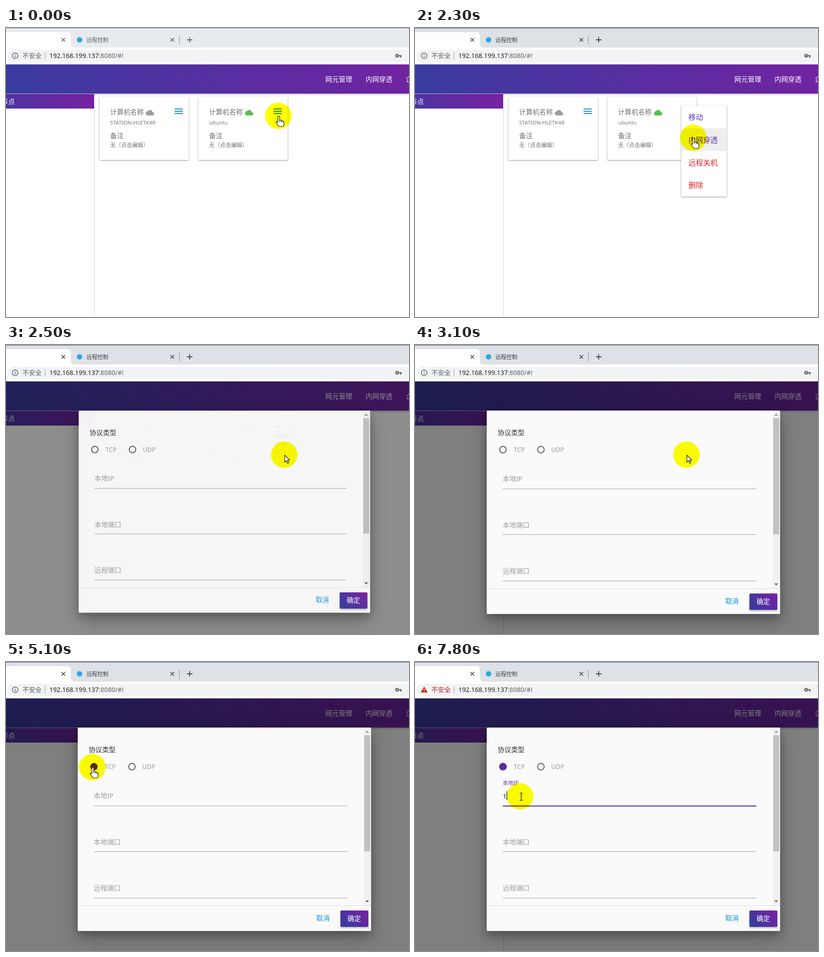
An HTML page for the animation above (8 s loop, 882x635 px).

```html
<!DOCTYPE html>
<html lang="zh-CN">
<head>
<meta charset="utf-8">
<title>远程控制</title>
<style>
html, body { margin: 0; width: 100%; height: 100%; overflow: hidden; background: #fff; }
svg { display: block; width: 100vw; height: 100vh; }
text { font: 14.7px "Noto Sans", "Noto Sans CJK SC", "Noto Sans CJK", sans-serif; white-space: pre; }
.small { font-size: 11.6px; }
.tab { font-size: 12px; }
.url { font-size: 14.1px; }
.item { font-size: 16px; }
.line { fill: none; stroke-width: 1; }
.card { filter: drop-shadow(0 1px 1.5px rgba(0,0,0,.45)); }
#sheet { filter: drop-shadow(0 8px 9px rgba(0,0,0,.22)) drop-shadow(0 14px 20px rgba(0,0,0,.25)); }
#halo { mix-blend-mode: multiply; }
</style>
</head>
<body>
<svg viewBox="0 0 882 635">
  <defs>
    <linearGradient id="brand"><stop stop-color="#303f9f"/><stop offset="1" stop-color="#7b1fa2"/></linearGradient>
    <linearGradient id="navFill" href="#brand" gradientUnits="userSpaceOnUse" x1="154" y1="408" x2="746" y2="-184"/>
    <linearGradient id="sideFill" href="#brand" gradientUnits="userSpaceOnUse" x1="-42" y1="245" x2="125" y2="77"/>
    <linearGradient id="buttonFill" href="#brand" gradientUnits="userSpaceOnUse" x1="738" y1="588" x2="787" y2="540"/>
    <path id="cloud" transform="translate(306 177) scale(.76)" d="M19.35 10.04C18.67 6.59 15.64 4 12 4 9.11 4 6.6 5.64 5.35 8.04 2.34 8.36 0 10.91 0 14c0 3.31 2.69 6 6 6h13c2.76 0 5-2.24 5-5 0-2.64-2.05-4.78-4.65-4.96z"/>
    <path id="cross" d="M-4-4 4 4M4-4-4 4" stroke-width="1.6"/>
    <g id="card">
      <rect class="card" x="204.5" y="151" width="195.5" height="139" rx="2" fill="#fff"/>
      <g fill="#707070">
        <text x="228" y="190">计算机名称</text>
        <text x="228" y="242">备注</text>
        <text x="228" y="262" style="font-size:12px">无（点击编辑）</text>
      </g>
      <path d="M369 178h18M369 183h18M369 188h18" stroke="#0c8bd9" stroke-width="2"/>
    </g>
  </defs>

  <rect width="882" height="635" fill="#fff"/>

  <!-- page -->
  <path d="M193.5 177V635" stroke="#d8d8d8"/>
  <rect y="80" width="882" height="64" fill="url(#navFill)" style="filter:drop-shadow(0 1px 2px rgba(0,0,0,.4))"/>
  <g fill="#fff">
    <text x="699" y="118">网元管理</text>
    <text x="787" y="118">内网穿透</text>
    <text x="875" y="118">企业管理</text>
  </g>
  <rect y="145" width="193" height="32" fill="url(#sideFill)"/>
  <path d="M0 144.5H193" stroke="#c4c0cc"/>
  <text x="-10" y="166.500" fill="#fff">节点</text>
  <circle cx="183" cy="167" r="5" class="line" stroke="#fff" stroke-dasharray="1 3" opacity=".25"/>
  <use href="#card"/>
  <use href="#card" x="216.5"/>
  <use href="#cloud" fill="#9e9e9e"/>
  <use href="#cloud" x="217" fill="#5cbf50"/>
  <g fill="#757575">
    <text class="small" x="228" y="212">STATION-HLETK4R</text>
    <text class="small" x="445" y="212">ubuntu</text>
  </g>
  <rect id="shade" y="80" width="882" height="555"/>

  <!-- browser frame -->
  <rect id="strip" width="882" height="43"/>
  <rect id="edge" width="882" height="1"/>
  <path d="M0 9h134q8 0 8 8v18q0 8 8 8H0z" fill="#fff"/>
  <rect y="43" width="882" height="37" fill="#fff"/>
  <rect x="3" y="48" width="920" height="27" rx="13.5" fill="#f1f3f4"/>
  <g id="tabInk" stroke="currentColor" fill="none">
    <use href="#cross" x="125.500" y="26"/>
    <use href="#cross" x="364" y="26"/>
    <path d="M402 20v12M396 26h12" stroke-width="1.8"/>
    <text class="tab" x="176" y="31" fill="currentColor" stroke="none">远程控制</text>
  </g>
  <path d="M379.500 16v21" stroke="#8b8f95"/>
  <circle cx="161" cy="26" r="6" fill="#2ea8e0"/>
  <g id="info" fill="none" stroke="#5f6368" stroke-width="1.5">
    <circle cx="20" cy="61" r="6.300"/><path d="M20 60v4.500M20 57v1.600"/>
  </g>
  <g id="warning">
    <path d="M20 54l7.500 13h-15z" fill="#c5221f"/><path d="M20 59v4M20 64v1.600" stroke="#fff" stroke-width="1.5"/>
  </g>
  <text id="insecure" x="36" y="66" style="font-size:14px">不安全</text>
  <path d="M85.500 53v16" stroke="#9aa0a6"/>
  <text class="url" x="95" y="66" fill="#202124">192.168.199.137<tspan fill="#5f6368">:8080/#!</tspan></text>
  <g fill="none" stroke="#5f6368"><circle cx="856" cy="61" r="2.800" stroke-width="2.600"/><path d="M859 61h7M864 61v4" stroke-width="2.600"/></g>

  <!-- dialog -->
  <g id="modal">
    <rect id="sheet" x="157" y="144" width="642" height="447" rx="2" fill="#fafafa"/>
    <text x="181" y="198" fill="#333">协议类型</text>
    <g fill="none" stroke="#5a5a5a" stroke-width="2">
      <circle id="tcpRing" cx="192.500" cy="230" r="7.200"/><circle cx="275.500" cy="230" r="7.200"/>
    </g>
    <circle id="tcpDot" cx="192.500" cy="230" fill="#5a2ca0"/>
    <g fill="#9e9e9e">
      <text x="216" y="235" style="font-size:13.8px">TCP</text>
      <text x="298" y="235" style="font-size:13.8px">UDP</text>
      <text x="192" y="401">本地端口</text>
      <text x="192" y="502">远程端口</text>
    </g>
    <text id="ipLabel">本地IP</text>
    <path d="M192 316H747M192 416.500H747M192 518.500H747" stroke="#9e9e9e"/>
    <path id="ipLine" d="M192 316.500H747" stroke="#512da8" stroke-width="2"/>
    <text id="ipValue" x="192" y="300" fill="#222">1</text>
    <path id="caret" stroke="#000" stroke-width="1.200"/>
    <path d="M157 535.500H799" stroke="#e0e0e0"/>
    <rect x="783" y="144" width="15" height="391" fill="#f1f1f1"/>
    <rect x="784" y="161" width="13" height="255" fill="#c1c1c1"/>
    <path d="M786.500 155l4-4 4 4z" fill="#8a8a8a"/>
    <path d="M786.500 524l4 4 4-4z" fill="#505050"/>
    <text x="679" y="568" fill="#0a95dd">取消</text>
    <rect x="732" y="546" width="61" height="36" rx="2" fill="url(#buttonFill)" style="filter:drop-shadow(0 2px 2px rgba(0,0,0,.3))"/>
    <text x="747.500" y="569" fill="#fff" font-weight="500" style="font-weight:500">确定</text>
  </g>

  <!-- drop-down menu -->
  <g id="menu">
    <rect class="card" x="582.500" y="170.500" width="100" height="200" rx="1" fill="#fff"/>
    <rect id="hover" x="582.500" width="100" height="50" fill="#eee"/>
    <g fill="#5e35b1">
      <text class="item" x="598.500" y="202">移动</text><text class="item" x="598.500" y="252">内网穿透</text>
    </g>
    <g fill="#d32424">
      <text class="item" x="598.500" y="302">远程关机</text><text class="item" x="598.500" y="351">删除</text>
    </g>
  </g>

  <circle id="halo" r="29" fill="#ff0"/>
  <g id="pointer" stroke="#111" stroke-width="1.200" stroke-linejoin="round" fill="#fff">
    <path id="hand" d="M-1 2.500q0-2 2-2t2 2v7q3.500-.5 4 1.500q3-.5 3.500 1.500q2 0 2 2.500v3q0 3-2 5.500h-9l-6.500-8.500q0-2.500 3-1.500l1 1.500zM3 9.500v4M7 11v3M10.500 12.500v2"/>
    <path id="arrow" d="M1 1v15.500l3.600-3.400 2.600 5.900 2.400-1-2.600-5.800h5z"/>
    <path id="beam" fill="none" d="M-1-7h2.500l1 1 1-1H6M2.500-6V8M-1 9h2.500l1-1 1 1H6"/>
  </g>
</svg>
<script>
const LOOP = 8000, STEP = 100;
const $ = id => document.getElementById(id);
const set = (id, attrs) => { for (const k in attrs) $(id).setAttribute(k, attrs[k]); };
const show = (id, on) => $(id).style.display = on ? '' : 'none';
const progress = (t, start, length) => Math.min(1, Math.max(0, (t - start) / length));
const easeOut = (p, power) => 1 - (1 - p) ** power;
const mix = (a, b, p) => a + (b - a) * p;

// time, x, y
const route = [
  [0, 596, 193], [100, 596, 193], [400, 590, 177], [600, 591, 174], [900, 597, 202], [1300, 609, 241],
  [3000, 609, 241], [3100, 594, 241], [3400, 520, 251], [3700, 425, 274], [3900, 400, 277],
  [4000, 385, 281], [4300, 315, 280], [4500, 250, 257], [4700, 195, 225], [4800, 189, 222],
  [5000, 189, 231], [5200, 189, 231], [5700, 222, 302], [6000, 222, 302], [6500, 230, 295], [LOOP, 230, 295]
];

function pointerAt(t) {
  const i = route.findIndex(stop => stop[0] > t);
  const a = route[i - 1], b = route[i], p = progress(t, a[0], b[0] - a[0]);
  return [mix(a[1], b[1], p), mix(a[2], b[2], p)];
}

function drawPage(t) {
  const active = t >= 2300, typed = t >= 7700;
  set('strip', { fill: active ? '#dee1e6' : '#e7eaee' });
  set('edge', { fill: active ? '#4a6488' : '#a2a7ae' });
  $('tabInk').style.color = active ? '#3c4043' : '#5f6368';
  show('info', !typed);
  show('warning', typed);
  set('insecure', { fill: typed ? '#c5221f' : '#5f6368' });
}

function drawMenu(t, y) {
  const open = easeOut(progress(t, 70, 150), 2), close = easeOut(progress(t, 2330, 250), 2);
  const shown = open * (1 - close);
  show('menu', shown > 0);
  set('menu', { opacity: shown, transform: `translate(582 170) scale(${mix(.3, 1, shown)}) translate(-582 -170)` });
  set('hover', { y: y < 221 ? 170.5 : 220.5 });
}

function drawDialog(t) {
  const p = progress(t, 2330, 250), grown = easeOut(p, 3);
  set('shade', { opacity: .5 * easeOut(p, 2) });
  show('modal', p > 0);
  set('modal', {
    opacity: grown,
    transform: `translate(478 ${367.5 - 38 * (1 - grown)}) scale(${mix(.8, 1, grown)}) translate(-478 -367.5)`
  });

  const picked = easeOut(progress(t, 4950, 280), 3);
  set('tcpDot', { r: 8.2 * picked });
  set('tcpRing', { stroke: picked > .9 ? '#5a2ca0' : '#5a5a5a' });

  const focusTime = 6600, focused = t >= focusTime, typed = t >= 7700;
  const lift = easeOut(progress(t, focusTime - 40, 200), 2);
  set('ipLabel', {
    fill: focused ? '#5e35b1' : '#9e9e9e',
    transform: `translate(192 ${mix(299, 270, lift)}) scale(${mix(1, .8, lift)})`
  });
  set('ipLine', { opacity: lift });
  show('ipValue', typed);
  show('caret', focused && (typed || (t - focusTime) % 1060 < 530));
  set('caret', { d: `M${typed ? 201 : 192.5} 284v19` });
}

function drawPointer(t, x, y) {
  const shape = t < 2500 ? 'hand' : y > 270 ? 'beam' : x < 245 && y < 242 ? 'hand' : 'arrow';
  for (const id of ['hand', 'arrow', 'beam']) show(id, id === shape);
  set('halo', { cx: x, cy: y });
  set('pointer', { transform: `translate(${x} ${y})` });
}

function frame(now) {
  const t = Math.floor(now % LOOP / STEP) * STEP;
  const [x, y] = pointerAt(t);
  drawPage(t);
  drawMenu(t, y);
  drawDialog(t);
  drawPointer(t, x, y);
  requestAnimationFrame(frame);
}
frame(0);
</script>
</body>
</html>
```
